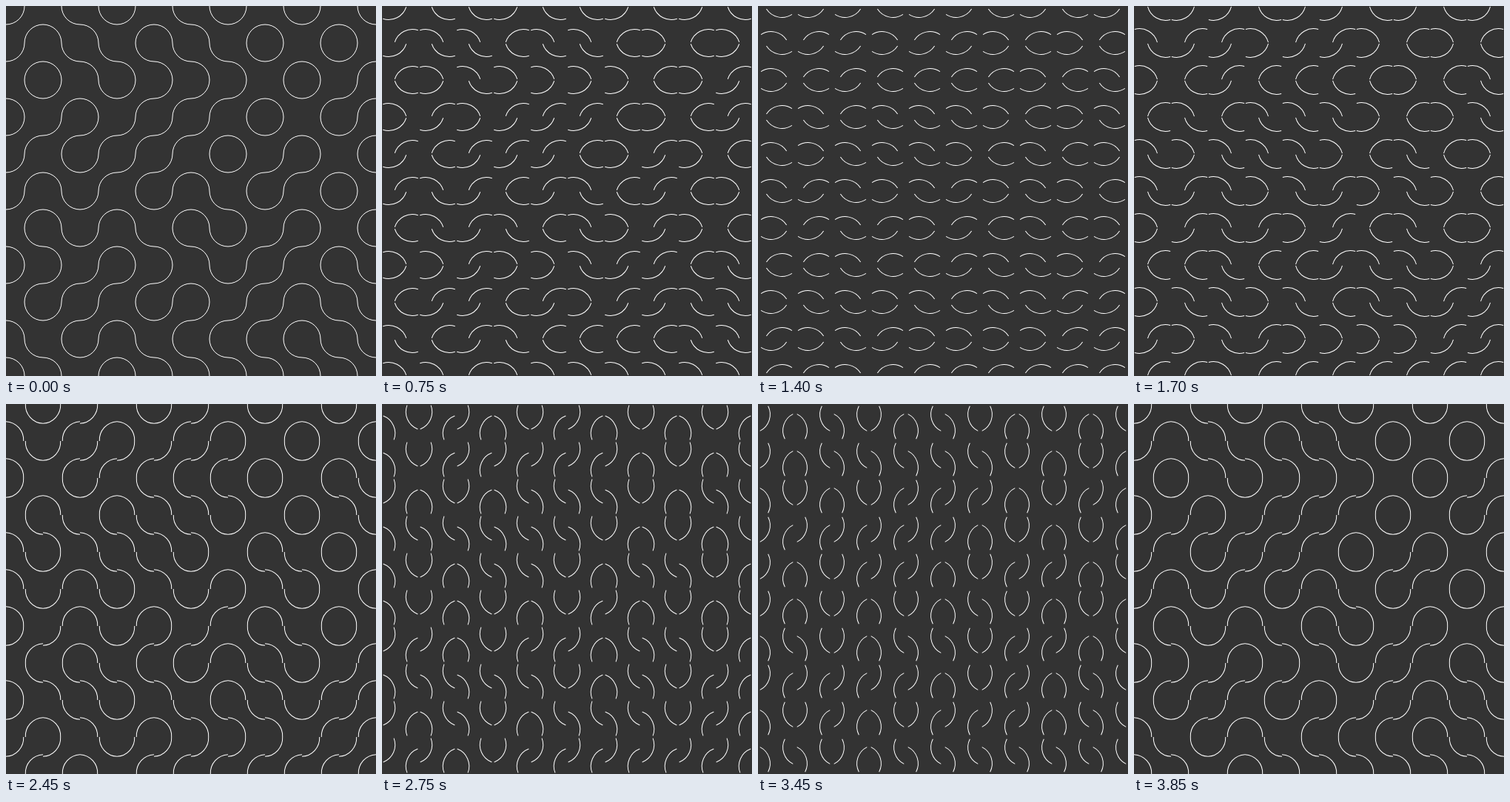
An HTML page with a canvas that plays this animation: 500x500 px, repeating every 3900 ms.

```html
<!DOCTYPE html>
<html lang="en">
<head>
<meta charset="utf-8">
<title>Turning tiles</title>
<style>
  html, body { margin: 0; width: 100%; height: 100%; overflow: hidden; background: #333; }
  canvas { display: block; }
</style>
</head>
<body>
<canvas id="stage" width="500" height="500"></canvas>
<script>
const ctx = document.getElementById('stage').getContext('2d');
const SIZE = 50, HALF = SIZE / 2;
const TICK = 50, LOOP = 3900;

// a: arcs at top left and bottom right, turns clockwise
// b: arcs at top right and bottom left, turns the other way
const TILES = [
  'abbabbabab',
  'abbbbbbaba',
  'babaaaabaa',
  'aaaaaababa',
  'abaaabaaab',
  'abababbaba',
  'bbabbbaaab',
  'aaaaabaabb',
  'baabaaaabb',
  'bbabbbbbbb'
];

// Two quarter turns of 3 degrees per tick, each after a rest.
function angleAt(ms) {
  const tick = Math.floor((ms % LOOP) / TICK);
  const turn = start => Math.min(Math.max(tick - start, 0), 30) * 3;
  return (turn(9) + turn(48)) * Math.PI / 180;
}

function drawTile(col, row, type, angle) {
  const dir = type === 'a' ? 1 : -1;
  ctx.save();
  ctx.translate(col * SIZE + HALF, row * SIZE + HALF);
  ctx.rotate(dir * angle);
  ctx.scale(dir, 1);
  ctx.beginPath();
  ctx.arc(-HALF, -HALF, HALF, 0, Math.PI / 2);
  ctx.moveTo(0, HALF);
  ctx.arc(HALF, HALF, HALF, Math.PI, Math.PI * 1.5);
  ctx.stroke();
  ctx.restore();
}

function draw(ms) {
  const angle = angleAt(ms);
  ctx.fillStyle = '#333';
  ctx.fillRect(0, 0, 500, 500);
  ctx.strokeStyle = '#fff';
  ctx.lineWidth = 0.998; // just under 1 stays a hairline at every angle
  TILES.forEach((line, row) =>
    [...line].forEach((type, col) => drawTile(col, row, type, angle)));
}

const began = performance.now();
function frame() {
  draw(performance.now() - began);
  requestAnimationFrame(frame);
}
frame();
</script>
</body>
</html>
```
